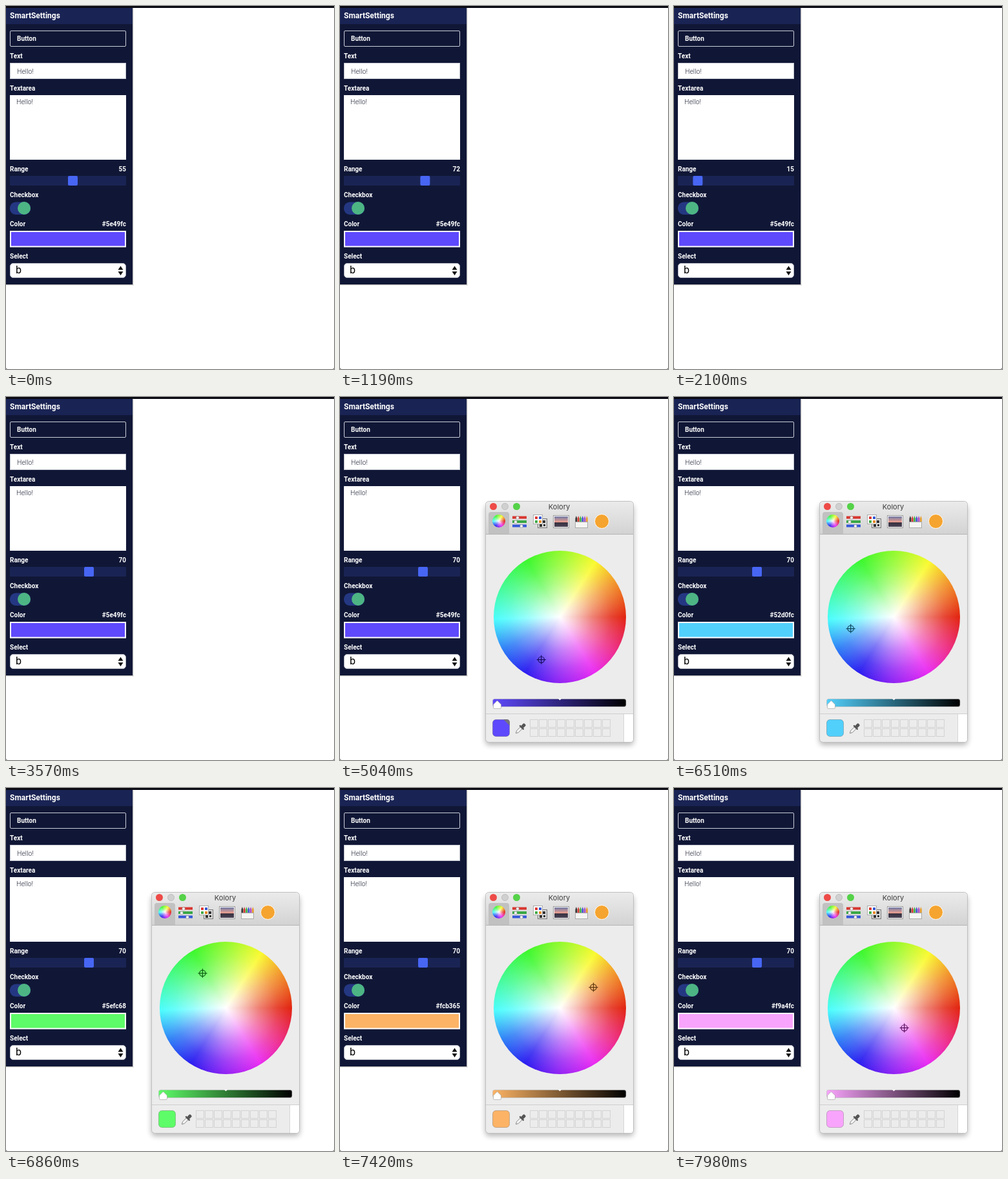
An HTML page for the animation above (8 s loop, 508 by 562 pixels).

```html
<!DOCTYPE html>
<html lang="en">
<head>
<meta charset="utf-8">
<title>SmartSettings</title>
<style>
html, body { margin: 0; width: 100%; height: 100%; overflow: hidden; background: #fff; }
svg { display: block; position: absolute; left: 0; top: 0; }
text { font: 700 10px Roboto, sans-serif; fill: #fff; }
.title { font-size: 12px; }
.input { font-weight: 300; font-size: 10.5px; fill: #22263a; }
.end { text-anchor: end; }
.wheel {
  width: 100%; height: 100%; border-radius: 50%;
  background:
    radial-gradient(closest-side, #fff, rgba(255,255,255,.72) 25%, rgba(255,255,255,.42) 50%, rgba(255,255,255,.15) 78%, rgba(255,255,255,0)),
    conic-gradient(from 90deg, #e2230f, #ee2c8a 32deg, #ea2cf2 58deg, #8c22f4 92deg, #2a1df0 122deg, #2d7cf6 150deg, #4bfdfd 178deg, #43fb92 208deg, #3bf82c 240deg, #9cfa2c 274deg, #fafa2e 303deg, #f2942a 328deg, #e2230f);
}
</style>
</head>
<body>
<svg width="508" height="562" viewBox="0 0 508 562">
  <defs>
    <filter id="soft" x="-20%" y="-20%" width="140%" height="140%"><feGaussianBlur stdDeviation="4"/></filter>
    <linearGradient id="bar" x2="0" y2="1"><stop stop-color="#ebebeb"/><stop offset="1" stop-color="#d3d3d3"/></linearGradient>
    <linearGradient id="shade"><stop id="shadeStart"/><stop offset="1" stop-color="#000"/></linearGradient>
    <linearGradient id="dusk" x2="0" y2="1"><stop stop-color="#6f7aa5"/><stop offset=".55" stop-color="#f0a190"/><stop offset=".6" stop-color="#35303f"/><stop offset="1" stop-color="#4d4658"/></linearGradient>
  </defs>
  <rect width="508" height="562" fill="#fff"/>
  <path d="M0 560v2h2zM508 560v2h-2z" fill="#888"/>

  <!-- settings panel -->
  <rect y="4" width="198" height="429" fill="#000" opacity=".08"/>
  <rect y="3" width="197" height="429" fill="#000" opacity=".22"/>
  <rect y="3" width="196" height="428" fill="#101736"/>
  <rect y="3" width="196" height="25" fill="#1a2454"/>
  <rect width="508" height="3" fill="#0a0a12"/>
  <text class="title" x="6" y="19">SmartSettings</text>
  <rect x="6.5" y="38.5" width="179" height="24" rx="1.5" fill="none" stroke="#c9ccd8"/>
  <text x="17" y="54">Button</text>
  <text x="6" y="81">Text</text>
  <rect x="6.5" y="88.5" width="179" height="24" fill="#fff" stroke="#c8cad4"/>
  <text class="input" x="17" y="105">Hello!</text>
  <text x="6" y="131">Textarea</text>
  <rect x="6" y="138" width="180" height="100" fill="#fff"/>
  <text class="input" x="16" y="152">Hello!</text>
  <text x="6" y="256">Range</text>
  <text class="end" id="rangeText" x="186" y="256"></text>
  <rect x="6" y="263" width="180" height="15" rx="1" fill="#1a2454"/>
  <rect id="thumb" y="263" width="15" height="15" rx="2" fill="#4766f4"/>
  <text x="6" y="296">Checkbox</text>
  <rect x="6" y="303.5" width="32" height="19.5" rx="9" fill="#243782"/>
  <circle id="knob" cy="313" r="10"/>
  <text x="6" y="341">Color</text>
  <text class="end" id="colorText" x="186" y="341"></text>
  <rect id="colorBox" x="7" y="349" width="178" height="23.5" stroke="#fff" stroke-width="2"/>
  <text x="6" y="391">Select</text>
  <rect x="6.5" y="398.5" width="179" height="22" rx="4.5" fill="#fff" stroke="#b9bcc6"/>
  <text x="15" y="414" style="font-weight:400;font-size:16px;fill:#000">b</text>
  <path d="M173.5 408.5l4-6 4 6zM173.5 411l4 6 4-6z" fill="#111"/>

  <!-- colour picker -->
  <g id="picker">
    <rect x="225" y="167" width="230" height="372" rx="6" fill="#000" opacity=".28" filter="url(#soft)"/>
    <rect x="225.5" y="161.5" width="229" height="373" rx="5" fill="#ececec" stroke="#c0c0c0"/>
    <path d="M226 212v-45q0-5 5-5h218q5 0 5 5v45z" fill="url(#bar)"/>
    <path d="M226 212.5h228" stroke="#b5b5b5"/>
    <circle cx="237.5" cy="169.5" r="5.5" fill="#ee4b48"/>
    <circle cx="255.5" cy="169.5" r="5" fill="#d0d0d0" stroke="#bdbdbd"/>
    <circle cx="273.5" cy="169.5" r="5.5" fill="#55d249"/>
    <text x="339.5" y="174" text-anchor="middle" style="font:400 11px Inter,sans-serif;fill:#3c3c3c">Kolory</text>

    <path d="M230 212v-30q0-4 4-4h24q4 0 4 4v30z" fill="#c1c1c1"/>
    <foreignObject x="236" y="182" width="20" height="20"><div class="wheel"></div></foreignObject>
    <g id="bars"></g>
    <rect x="306.5" y="188.5" width="14" height="14" fill="#ddd" stroke="#777"/>
    <path d="M314 191h4v4h-4zM309 197h4v4h-4zM315 197h3v3h-3z" fill="#333"/>
    <rect x="299.5" y="182.5" width="14" height="14" fill="#fff" stroke="#aaa"/>
    <g id="dots"></g>
    <rect x="330.5" y="183.5" width="24" height="19" fill="#fff" stroke="#999"/>
    <rect x="332" y="185" width="21" height="16" fill="url(#dusk)"/>
    <g id="pencils"></g>
    <circle cx="405.5" cy="192.5" r="11" fill="#f5a42f" stroke="#fff"/>

    <foreignObject x="238" y="237.5" width="205" height="205"><div class="wheel"></div></foreignObject>
    <g id="cross" fill="none" stroke-width="1.2"><circle r="4.7"/><path d="M-7 0H7M0-7V7"/></g>

    <rect x="236.5" y="467.5" width="206.5" height="12" rx="3" fill="url(#shade)" stroke="#bbb" stroke-width=".6"/>
    <path d="M338 467h5l-2.5 2.5z" fill="#fff"/>
    <path d="M243.5 470l6 6v5q0 1.500-1.500 1.500h-9q-1.500 0-1.500-1.500v-5z" fill="#fff" stroke="#999" stroke-width=".6"/>

    <path d="M226 490.500h228" stroke="#cfcfcf"/>
    <path d="M440 491h14v38q0 5-4 5h-10z" fill="#fff"/>
    <path d="M439.500 491v43" stroke="#d6d6d6"/>
    <rect id="swatch" x="236.500" y="499.500" width="26" height="26" rx="5" stroke="#000" stroke-opacity=".2"/>
    <path id="fold" d="M253 499h5q5 0 5 5v5z" fill="#77747f"/>
    <g transform="translate(279.500 513.500) rotate(45)">
      <rect x="-2.500" y="-10" width="5" height="7" rx="2" fill="#555"/>
      <rect x="-4.500" y="-4" width="9" height="2.500" rx="1" fill="#555"/>
      <path d="M-2-1.500h4v8l-2 3.500-2-3.500z" fill="#f3f3f3" stroke="#777" stroke-width=".8"/>
    </g>
    <g id="cells" fill="none" stroke="#d2d2d2"></g>
  </g>
</svg>
<script>
const LOOP = 8000, STEP = 70, OPEN = 5040;
const $ = id => document.getElementById(id);
const set = (id, attrs) => {
  for (const k in attrs) $(id).setAttribute(k, attrs[k]);
};
const box = (x, y, w, h, fill) =>
  `<rect x="${x}" y="${y}" width="${w}" height="${h}"${fill ? ` fill="${fill}"` : ''}/>`;

// Small repeated parts
$('bars').innerHTML = ['#d8352f', '#39a845', '#3557d8'].map((c, i) =>
  box(267, 184.5 + i * 6.5, 22, 4, c) +
  `<circle cx="${[275, 272, 281][i]}" cy="${187 + i * 6.5}" r="2.300" fill="#fff" stroke="#888" stroke-width=".6"/>`).join('');
$('dots').innerHTML = ['#dc3a36', '#3659d8', '#43a948', '#e88a2c'].map((c, i) =>
  box(302 + i % 2 * 6, 185 + (i >> 1) * 6, 4, 4, c)).join('');
$('pencils').innerHTML = ['#333', '#d63c34', '#43b649', '#4257d0', '#b04bc4', '#e5a033'].map((c, i) => {
  const x = 364.5 + i * 3.3;
  return box(x, 188, 2.8, 6, c) + `<path d="M${x} 188l1.400-4 1.400 4z" fill="${c}"/>`;
}).join('') + '<rect x="364.500" y="193.500" width="19" height="9" fill="#f4f4f2" stroke="#aaa"/>';
let cells = '';
for (let i = 0; i < 18; i++) cells += box(294.5 + i % 9 * 14, 499.5 + (i / 9 | 0) * 14, 12, 12);
$('cells').innerHTML = cells;

// Eased value between keys of the form [time, value]
function ease(t, keys) {
  if (t <= keys[0][0]) return keys[0][1];
  for (let i = 1; i < keys.length; i++) {
    const [t0, a] = keys[i - 1], [t1, b] = keys[i];
    if (t <= t1) {
      const p = (t - t0) / (t1 - t0);
      return a + (b - a) * p * p * (3 - 2 * p);
    }
  }
  return keys[keys.length - 1][1];
}

function rgb(hue, sat, val) {
  return [5, 3, 1].map(n => {
    const k = (n + hue / 60 + 12) % 6;
    return Math.round(val * (1 - sat * Math.max(0, Math.min(k, 4 - k, 1))));
  });
}
const hex = c => '#' + c.map(v => v.toString(16).padStart(2, '0')).join('');

const range = [[980, 55], [1330, 82], [2100, 15], [2240, 11], [2730, 70]];
const check = [[3570, 1], [3850, 0], [4270, 0], [4480, 1]];
const hues = [[6230, 247.04], [6860, 123.8], [7980, -62.05]];
const sats = [[6230, .7103], [6860, .627], [7420, .6], [7980, .3492]];

function draw(time) {
  const t = Math.floor(time / STEP) * STEP;
  const value = Math.round(ease(t, range));
  $('rangeText').textContent = value;
  set('thumb', { x: 4.33 + value * 5 / 3 });

  const on = ease(t, check);
  const mix = (a, b) => Math.round(a + (b - a) * on);
  set('knob', { cx: 16 + 12 * on, fill: `rgb(${mix(71, 77)},${mix(102, 181)},${mix(190, 132)})` });

  const hue = ease(t, hues), sat = ease(t, sats);
  const color = rgb(hue, sat, 252), code = hex(color);
  $('colorText').textContent = code;
  set('colorBox', { fill: code });
  set('swatch', { fill: code });
  set('shadeStart', { 'stop-color': code });

  const a = hue * Math.PI / 180, r = sat * 102;
  const x = 340 + r * Math.cos(a), y = 340 - r * Math.sin(a);
  set('cross', { transform: `translate(${x} ${y})`, stroke: hex(rgb(hue, .85, 95)) });
  set('fold', { display: t > 6230 ? 'none' : 'inline' });
  set('picker', { display: t < OPEN ? 'none' : 'inline' });
}

const start = performance.now();
function tick() {
  draw((performance.now() - start) % LOOP);
  requestAnimationFrame(tick);
}
tick();
</script>
</body>
</html>
```
